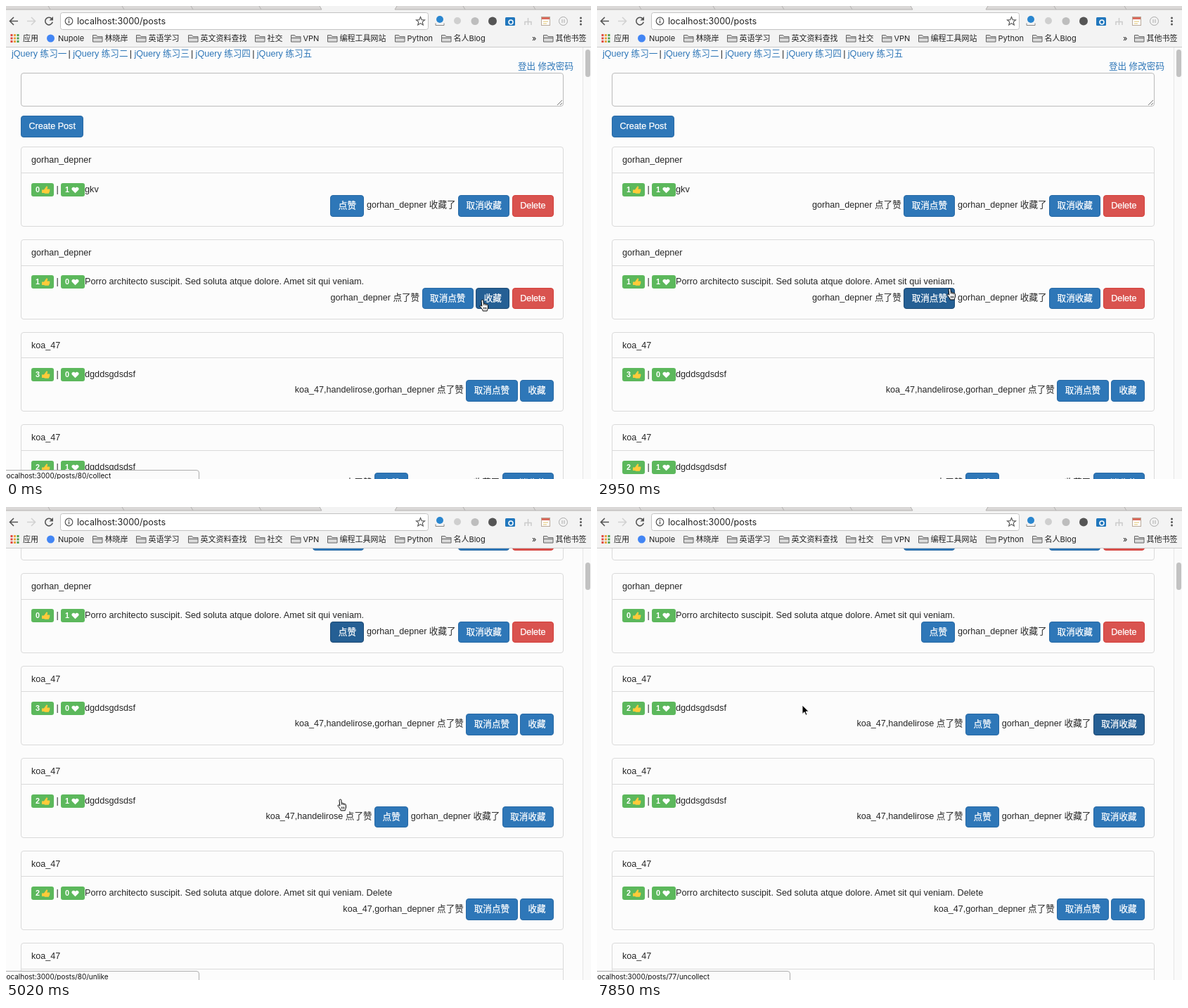
An HTML page for the animation above (8 s loop, 832 px wide and 673 px high).

```html
<!DOCTYPE html>
<html lang="zh-CN">
<head>
<meta charset="utf-8">
<title>Posts</title>
<style>
  html, body { margin: 0; width: 100%; height: 100%; overflow: hidden; background: #fcfcfc; }
  body { position: relative; color: #262626; font: 12.6px/18px 'Liberation Sans', 'Noto Sans CJK SC', 'Noto Sans CJK', sans-serif; }
  #view { position: absolute; left: 0; top: 59px; width: 832px; height: 614px; overflow: hidden; }
  #page { position: absolute; left: 0; top: -59px; width: 820px; }
  #page > *, .panel > * { position: absolute; white-space: nowrap; box-sizing: border-box; }
  .link { color: #2f77b8; }
  .area { left: 21px; top: 95px; width: 772px; height: 48px; border: 1px solid #bbb; border-radius: 4px; }
  .area svg { position: absolute; right: 0; bottom: 0; }
  .btn { height: 30.6px; padding: 0 10.4px; box-sizing: border-box; border: 1px solid #2769a5; border-radius: 4px;
    background: #2e77b8; color: #fff; line-height: 29px; font-weight: 500; -webkit-text-stroke: .25px #fff; }
  .btn.hot { background: #255f94; border-color: #1d4a74; }
  .btn.del { background: #d9534f; border-color: #d43f3a; }
  .panel { left: 21px; width: 772px; height: 113.5px; border: 1px solid #dadada; border-radius: 4px; }
  .head { left: 0; top: 0; width: 100%; height: 36.5px; padding-left: 14px; line-height: 36px; border-bottom: 1px solid #dadada; }
  .badge { top: 50.4px; height: 19px; border-radius: 3px; background: #5cb85c; color: #fff;
    font-weight: 700; font-size: 10.8px; line-height: 19px; padding-left: 6px; }
  .badge svg { position: absolute; left: 14px; top: 3px; }
  .line { top: 50.4px; font-size: 12.7px; }
  .foot { right: 13px; top: 67.6px; height: 30.6px; display: flex; gap: 3.5px; align-items: center; }
  .foot span { margin-top: -2px; }
  #track { position: absolute; left: 820px; top: 0; width: 11px; height: 100%; border-left: 1px solid #e6e6e6; background: #fafafa; }
  #thumb { position: absolute; left: 3px; width: 7px; height: 39px; border-radius: 4px; background: #c2c2c2; }
  #status { position: absolute; left: -3px; top: 660px; width: 276px; height: 16px; border: 1px solid #aeaeae; border-radius: 0 4px 0 0;
    background: #fbfbfb; color: #111; font: 10px/15px Inter, sans-serif; white-space: nowrap; }
  #bar { position: absolute; left: 0; top: 0; }
  #bar text { font: 11px Inter, 'Noto Sans CJK SC', 'Noto Sans CJK', sans-serif; fill: #222; }
  #bar .url { font-size: 12.6px; }
  #cursor { position: absolute; width: 14px; height: 18px; overflow: visible; }
</style>
</head>
<body>
<div id="view">
  <div id="page"></div>
  <div id="track"><div id="thumb"></div></div>
</div>
<svg id="bar" width="832" height="59" viewBox="0 0 832 59">
  <rect width="832" height="59" fill="#f3f3f3"/>
  <rect width="832" height="5" fill="#dad8d7"/>
  <path d="M446 0l3 5H553l3-5z" fill="#f3f3f3"/>
  <path d="M0 5H449L446 0M556 0l-3 5H832M60 0l3 5M165 0l3 5M263 0l3 5M360 0l3 5M650 0l3 5M750 0l3 5" fill="none" stroke="#b3b1b0"/>
  <path d="M0 58.5H832" stroke="#cbcbcb"/>
  <g fill="none" stroke="#555" stroke-width="1.6">
    <path d="M17 21.5H6M11 16l-5.5 5.5L11 27"/>
    <path d="M30 21.5h11M36 16l5.5 5.5L36 27" stroke="#d2d2d2"/>
    <path d="M65.2 18.2a5.3 5.3 0 1 0 1 4.6"/>
  </g>
  <path d="M67 15v5.5h-5.5z" fill="#555"/>
  <rect x="77.5" y="9.5" width="523" height="24" rx="3" fill="#fff" stroke="#c3c3c3"/>
  <circle cx="89.5" cy="21.5" r="5.3" fill="none" stroke="#555" stroke-width="1.2"/>
  <path d="M89.5 20.5v4M89.5 18v1.4" stroke="#555" stroke-width="1.4"/>
  <text class="url" x="101" y="26">localhost:3000/posts</text>
  <path d="M589.5 15.5l1.7 4.1 4.4.3-3.4 2.8 1.1 4.3-3.8-2.4-3.8 2.4 1.1-4.3-3.4-2.8 4.4-.3z" fill="none" stroke="#555" stroke-width="1.1"/>
  <circle cx="617" cy="19" r="5" fill="#2a86cf"/>
  <path d="M611 24.5v3h12v-3" fill="none" stroke="#888"/>
  <circle cx="642" cy="21" r="5" fill="#cfcfcf"/>
  <circle cx="667" cy="21.5" r="5.5" fill="#bdbdbd"/>
  <circle cx="692" cy="21.5" r="6" fill="#555"/>
  <rect x="710" y="16" width="14" height="12" rx="1.5" fill="#2177bd"/>
  <circle cx="718" cy="23" r="3" fill="none" stroke="#fff" stroke-width="1.5"/>
  <path d="M742.5 17v5M738 27v-4.5h9V27M742.5 22v5" fill="none" stroke="#ccc" stroke-width="1.5"/>
  <rect x="761.5" y="15.5" width="12" height="12" fill="#fff" stroke="#b9a99a"/>
  <path d="M762 17.5h11" stroke="#d96a5c" stroke-width="3"/>
  <path d="M764 22h7M764 25h5" stroke="#e0c36a"/>
  <circle cx="792.5" cy="21.5" r="6" fill="none" stroke="#aaa"/>
  <path d="M791 19v5M794 19v5" stroke="#aaa"/>
  <g fill="#555"><circle cx="817.5" cy="17" r="1.5"/><circle cx="817.5" cy="21.5" r="1.5"/><circle cx="817.5" cy="26" r="1.5"/></g>
  <g id="marks"></g>
  <text x="24" y="50">应用</text>
  <circle cx="63.5" cy="46" r="5.5" fill="#4285f4"/>
  <text x="74" y="50">Nupole</text>
  <text x="748" y="50">»</text>
</svg>
<div id="status"></div>
<svg id="cursor" viewBox="0 0 14 18">
  <g id="hand" fill="#fff" stroke="#000" stroke-linejoin="round">
    <path d="M4 1.2c1-.5 1.8 0 1.9 1l.4 4.3c1-.5 1.7-.2 2 .4.9-.4 1.6 0 1.9.7 1-.3 2 .2 2.1 1.3l.2 3.1c0 1.6-.9 2.6-1.3 4.9H5.2C4.8 14.3 3 12.8 1.2 10.6c-.7-1 .4-2 1.5-1.4l1.2 1L3 2.6c0-.7.4-1.2 1-1.4z"/>
    <path d="M6.3 6.5l.2 2.3M8.3 7l.1 2M10.2 7.7v1.8M6.5 11.5v3M8.3 11.5v3M10 11.5v3" stroke-width=".8"/>
  </g>
  <path id="arrow" d="M1 1v12.5l3-2.8 2 4.6 2-.9-2-4.4h4.2z" fill="#000" stroke="#fff" stroke-width=".9"/>
</svg>
<script>
const $ = id => document.getElementById(id);
const LOOP = 8000, STEP = 147.7, LEAD = 14;
const me = 'gorhan_depner', koa = 'koa_47', hand = 'handelirose';
const lorem = 'Porro architecto suscipit. Sed soluta atque dolore. Amet sit qui veniam.';

// Each track lists [step, value...]; a value holds until the next entry.
const hover = [[0, '1f'], [6, ''], [13, '0l'], [19, ''], [20, '1l'], [35, ''], [39, '2f'], [41, '2l'], [46, '2f']];
const status = [[0, '80/collect'], [5, '80/uncollect'], [8, ''], [13, '82/like'], [19, '82/unlike'], [20, ''],
  [21, '80/unlike'], [36, ''], [39, '77/collect'], [41, '77/unlike'], [44, '77/like'], [46, '77/collect'], [53, '77/uncollect']];
const scroll = [[0, 0], [32, 3.5], [33, 130], [34, 238]];
const pointer = [[0, 680, 426], [1, 686, 424], [5, 672, 430], [6, 640, 436], [7, 606, 434], [8, 570, 430], [9, 535, 415],
  [10, 515, 385], [11, 500, 358], [12, 490, 338], [13, 487, 300], [14, 485, 291], [19, 518, 352], [20, 504, 410],
  [21, 494, 414], [22, 486, 419], [23, 478, 422], [32, 478, 424], [36, 560, 400], [37, 650, 375], [38, 730, 345],
  [39, 750, 318], [40, 735, 317], [41, 724, 318], [42, 721, 318], [46, 737, 317], [47, 752, 317], [53, 298, 290]];
const at = (track, n) => track.filter(k => k[0] <= n).pop();

const postsAt = n => [
  { by: me, text: 'gkv', likes: n < 18 ? [] : [me], favs: [me] },
  { by: me, text: lorem, likes: n < 29 ? [me] : [], favs: n < 3 ? [] : [me] },
  { by: koa, text: 'dgddsgdsdsf', likes: n < 44 ? [koa, hand, me] : [koa, hand], favs: n < 49 ? [] : [me] },
  { by: koa, text: 'dgddsgdsdsf', likes: [koa, hand], favs: [me] },
  { by: koa, text: lorem + ' Delete', likes: [koa, me], favs: [] },
  { by: koa, text: lorem, likes: [koa], favs: [] }
];

const icon = (d, fill) => `<svg width="13" height="13" viewBox="0 0 13 13"><path d="${d}" fill="${fill}"/></svg>`;
const thumbUp = icon('M1 6.5h3L7.5 1.5c1.5-.5 2 .8 1.5 2L8.3 5.5H11.5c1.2.2 1.2 1.3.5 1.7.6.6.3 1.5-.3 1.7.4.7 0 1.3-.6 1.5.2.9-.3 1.3-1.1 1.3H5.5L4 11H1z', '#ffcb3a');
const heart = icon('M6.5 11.3L2 6.8C-.2 3.8 4.3.8 6.5 4 8.7.8 13.2 3.8 11 6.8z', '#fff');

const button = (label, cls = '') => `<div class="btn ${cls}">${label}</div>`;
const badge = (x, w, count, pic) => `<div class="badge" style="left:${x}px;width:${w}px">${count}${pic}</div>`;

// A list of names, the verb, and the button that toggles it.
function action(names, verb, done, hot) {
  const note = names.length ? `<span>${names.join(',')} ${done}</span>` : '';
  return note + button((names.includes(me) ? '取消' : '') + verb, hot ? 'hot' : '');
}

function panel(p, i, hot) {
  return `<div class="panel" style="top:${200.4 + 131.6 * i}px">
    <div class="head">${p.by}</div>
    ${badge(14, 32, p.likes.length, thumbUp)}
    <div class="line" style="left:49.5px">|</div>
    ${badge(56, 34, p.favs.length, heart)}
    <div class="line" style="left:90px">${p.text}</div>
    <div class="foot">${action(p.likes, '点赞', '点了赞', hot === i + 'l')}${
      action(p.favs, '收藏', '收藏了', hot === i + 'f')}${p.by === me ? button('Delete', 'del') : ''}</div>
  </div>`;
}

const links = [...'一二三四五'].map((c, i) =>
  `<div class="link" style="left:${8 + 87.2 * i}px;top:59px">jQuery 练习${c}</div>` +
  (i < 4 ? `<div style="left:${88.6 + 87.2 * i}px;top:59px">|</div>` : '')).join('');
const header = links + `
  <div class="link" style="right:13px;top:77px">登出 修改密码</div>
  <div class="area"><svg width="9" height="9"><path d="M1 8L8 1M5 8l3-3" stroke="#777"/></svg></div>
  <div class="btn" style="left:21px;top:156px">Create Post</div>`;

function drawMarks() {
  const folders = [[123, '林晓岸'], [185, '英语学习'], [259, '英文资料查找'], [354, '社交'], [405, 'VPN'],
    [457, '编程工具网站'], [553, 'Python'], [619, '名人Blog'], [764, '其他书签']];
  const dots = ['#e0483e', '#e8a33d', '#4c9f50', '#4179d0'];
  let out = '';
  for (let i = 0; i < 9; i++) {
    const col = i % 3, row = i / 3 | 0;
    out += `<rect x="${6.5 + col * 4.5}" y="${40 + row * 4.5}" width="3" height="3" fill="${dots[(i + row) % 4]}"/>`;
  }
  for (const [x, name] of folders)
    out += `<path d="M${x + .5} 51V41.5h5l1.5 2h7V51zM${x + .5} 45.5h13.5" fill="#d9d9d9" stroke="#666"/>
      <text x="${x + 17.5}" y="50">${name}</text>`;
  $('marks').innerHTML = out;
}

let last = -1;
function draw(n) {
  const hot = at(hover, n)[1], y = at(scroll, n)[1], url = at(status, n)[1];
  const [, cx, cy] = at(pointer, n);
  $('page').innerHTML = header + postsAt(n).map((p, i) => panel(p, i, hot)).join('');
  $('page').style.top = -59 - y + 'px';
  $('thumb').style.top = 3 + y * .0714 + 'px';
  $('status').style.display = url ? '' : 'none';
  $('status').textContent = 'localhost:3000/posts/' + url;
  const over = hot && n < 53;
  $('hand').style.display = over ? '' : 'none';
  $('arrow').style.display = over ? 'none' : '';
  $('cursor').style.left = cx - 7 + 'px';
  $('cursor').style.top = cy - 9 + 'px';
}

function tick() {
  const n = Math.floor((performance.now() % LOOP + LEAD) / STEP);
  if (n !== last) draw(last = n);
  requestAnimationFrame(tick);
}
drawMarks();
tick();
</script>
</body>
</html>
```
